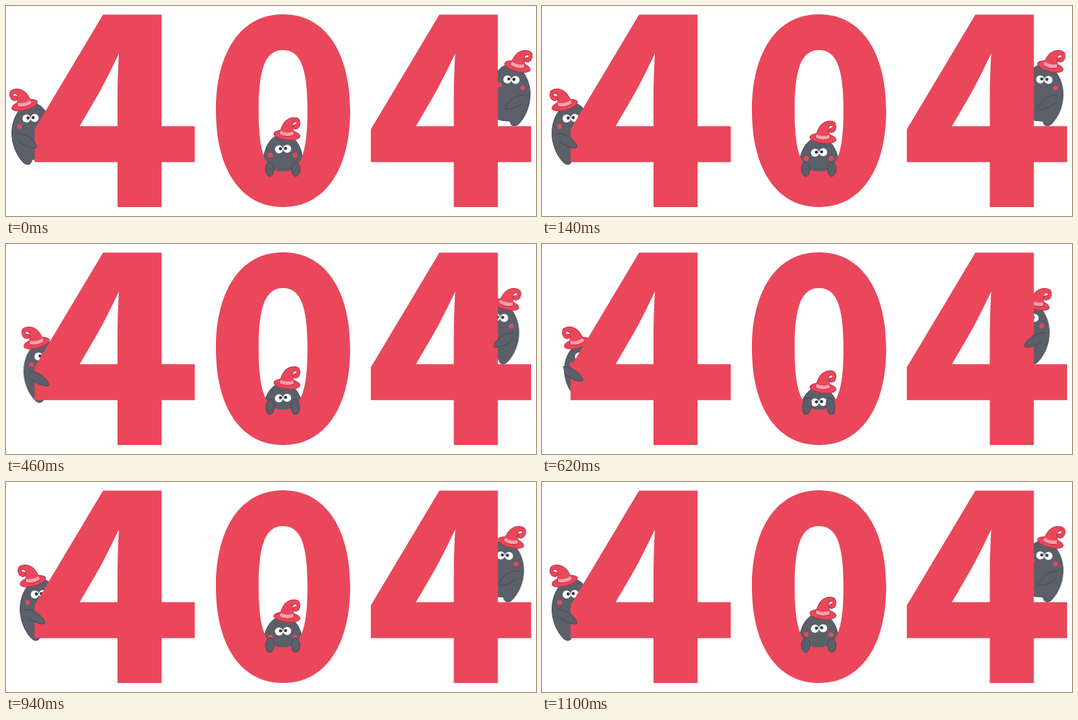
These frames come from a looping animation (770 px wide and 305 px high, 1.26 s). An HTML page:

```html
<!DOCTYPE html>
<html lang="en">
<head>
<meta charset="utf-8">
<title>404</title>
<style>
  html, body { margin: 0; width: 100%; height: 100%; overflow: hidden; background: #fff; }
  svg { display: block; width: 770px; height: 305px; }
  .red { fill: #ea475b; }
  .fur { fill: #5a5f69; stroke: #454953; stroke-width: 1; stroke-linejoin: round; stroke-linecap: round; }
  .felt { fill: #ea475b; stroke: #c52a42; stroke-width: 1; stroke-linejoin: round; }
  .band { fill: #f7a1ab; }
  .white { fill: #fff; }
  .pupil { fill: #33363d; }
</style>
</head>
<body>
<svg viewBox="0 0 770 305" role="img" aria-label="404">
  <defs>
    <g id="hat">
      <ellipse class="felt" rx="19" ry="7"/>
      <path class="felt" d="M-11 0C-10 -7 -8 -14 -5.500 -18C-1 -25 8 -28 13.500 -25.500C19 -21 18 -11.500 12 -10C7.500 -9.500 6 -13 8.500 -15.500C10 -17 12.500 -15.500 12.500 -18C12.500 -21.500 7.500 -21 6.500 -17C5.500 -13 9 -8 10.500 -1Q0 5 -11 0Z"/>
      <path class="band" d="M-10 -5Q0 -1 8.500 -6L10 -1.500Q0 4.300 -10.700 -.3Z"/>
    </g>
    <g id="eyes">
      <circle class="white" cx="-5.900" cy=".4" r="5.900"/>
      <circle class="white" cx="5.900" cy="-.4" r="5.900"/>
      <circle class="pupil" cx="-3.700" cy="-.4" r="2.300"/>
      <circle class="pupil" cx="3.700" cy="-1" r="2.300"/>
    </g>
    <path id="four" class="red" fill-rule="evenodd" d="M141 12.500H226V174.500H274.300V226.700H226V292H162V226.700H41.500V179ZM107 174.500H162V133Q162 105 164 69Q142 115 129.500 136Z"/>
    <path id="peeker-arm" class="fur" d="M16 185C24 185 31 188 35 191.500C40 195 46 203 44.500 205.500C41 207.500 30 205 19 197"/>
  </defs>
  <g id="back"></g>
  <use href="#four"/>
  <use href="#four" x="488.600"/>
  <path class="red" fill-rule="evenodd" d="M305 152C305 66 342 12 402.500 12S500 66 500 152S463 292 402.500 292S305 238 305 152ZM367 152C367 90 377 64 402.500 64S438 90 438 152S428 240.500 402.500 240.500S367 214 367 152Z"/>
  <g id="front"></g>
</svg>
<script>
  const LOOP = 1260, FIRST = 140, STEP = 160;
  const ORDER = [0, 1, 2, 3, 4, 3, 2, 1];
  const MIRROR = 'matrix(-1 0 0 1 770 -56)';

  // From fully out to fully hidden: shift, body stretch, arm x, arm y
  const PEEK = {
    left: [[0, 1, 0, 0], [6, 1, 6, 0], [12, 1, 12, 0], [17.5, 1, 17.5, 0], [24, .93, 14.5, -7]],
    right: [[0, 1, 0, 0], [4.5, 1, 4.5, 0], [9.5, 1, 9.5, 0], [16.5, 1, 16.5, 0], [24.5, 1, 24.5, 0]]
  };
  const SINK = [0, 5, 9, 16, 22];
  const PAW = [[0, 1], [0, 1], [2, 1.02], [4, 1.05], [9, 1.18]];

  const byId = id => document.getElementById(id);
  const move = (x, y) => `translate(${x}px, ${y}px)`;

  function addPeeker(side) {
    const flip = side === 'right' ? `transform="${MIRROR}"` : '';
    byId('back').innerHTML += `<g ${flip}><g id="${side}">
      <path id="${side}-body" class="fur" d="M38 141C22 141 8 162 8.500 186C9 204 17 219 25 227C28 231 34 231 36 228L38 223C48 223 60 222 66 212C72 195 66 141 38 141Z"/>
      <circle class="red" cx="19.500" cy="175" r="3.600"/>
      <circle class="red" cx="53" cy="170.500" r="3.600"/>
      <use href="#eyes" x="35.700" y="163"/>
      <use href="#hat" transform="translate(27 144) scale(-1 1) rotate(15)"/>
    </g></g>`;
    byId('front').innerHTML += `<g ${flip}><use id="${side}-arm" href="#peeker-arm"/></g>`;
  }

  function addSitter() {
    byId('back').innerHTML += `<g id="sitter">
      <path class="fur" d="M402.500 186C384 186 374 208 374 226V262H431V226C431 208 421 186 402.500 186Z"/>
      <circle class="red" cx="384" cy="216.500" r="3.600"/>
      <circle class="red" cx="420" cy="216.500" r="3.600"/>
      <use href="#eyes" x="402.500" y="207.700"/>
      <use href="#hat" transform="translate(408.200 187.300) rotate(6)"/>
    </g>`;
    for (const [id, x] of [['paw-left', 383], ['paw-right', 421]])
      byId('front').innerHTML += `<g transform="translate(${x} 247.500)"><ellipse id="${id}" class="fur" cy="-10.500" rx="6.200" ry="10.300"/></g>`;
  }

  // Holds each pose until the next one is due
  function play(id, poses) {
    const frames = ORDER.map((pose, i) => ({
      offset: i ? (FIRST + (i - 1) * STEP) / LOOP : 0,
      transform: poses[pose],
      easing: 'step-end'
    }));
    frames.push({ offset: 1, transform: poses[ORDER.at(-1)] });
    byId(id).animate(frames, { duration: LOOP, iterations: Infinity });
  }

  // Stretches the body around eye level
  const stretchBody = scale => `translate(0px, ${162 * (1 - scale)}px) scale(1, ${scale})`;

  Object.keys(PEEK).forEach(addPeeker);
  addSitter();

  for (const [side, poses] of Object.entries(PEEK)) {
    play(side, poses.map(([x]) => move(x, 0)));
    play(side + '-body', poses.map(([, scale]) => stretchBody(scale)));
    play(side + '-arm', poses.map(([, , x, y]) => move(x, y)));
  }
  play('sitter', SINK.map(y => move(0, y)));
  play('paw-left', PAW.map(([turn, size]) => `rotate(${turn}deg) scale(1, ${size})`));
  play('paw-right', PAW.map(([turn, size]) => `rotate(${-turn}deg) scale(1, ${size})`));
</script>
</body>
</html>
```
